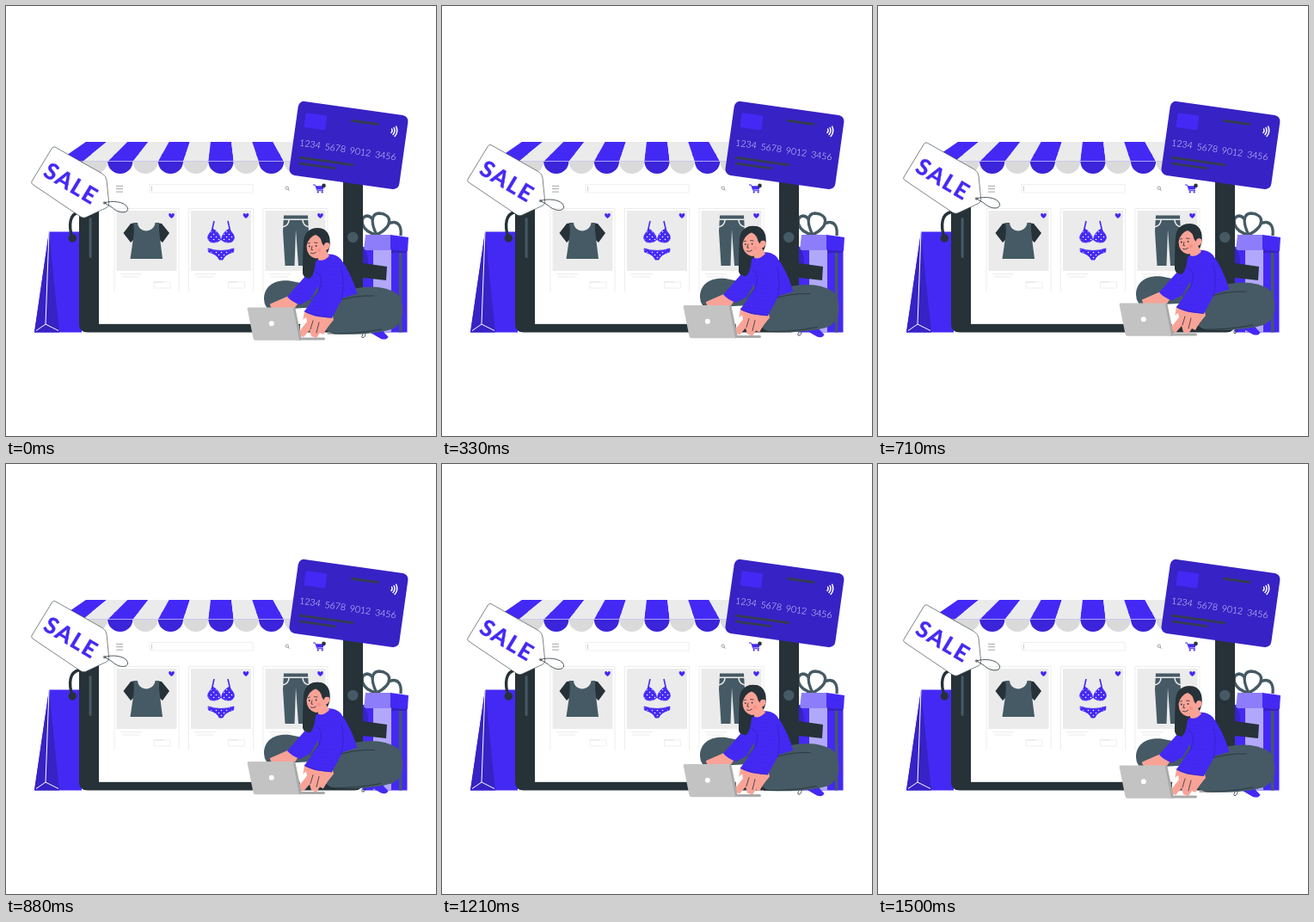
These frames come from a looping animation (500 by 500 pixels, 1540 ms). An HTML page:

```html
<!DOCTYPE html>
<html lang="en">
<head>
<meta charset="utf-8">
<title>Online shop</title>
<style>
html, body { margin: 0; width: 100%; height: 100%; overflow: hidden; background: #fff; }
svg { display: block; width: 100vw; height: 100vh; }
.blue { fill: #4429f5; }
.deep { fill: #3722c5; }
.ink { fill: #263238; }
.slate { fill: #455a64; }
.skin { fill: #f9a397; }
.line { fill: none; stroke: #263238; stroke-width: .8; stroke-linecap: round; stroke-linejoin: round; }
.fold { fill: none; stroke: #3722c5; stroke-width: .9; }
.pale { fill: none; stroke: #ececec; stroke-width: .8; }
</style>
</head>
<body>
<svg viewBox="0 0 500 500">
  <defs>
    <path id="heart" class="blue" d="M0 3.2C-5 -.4 -3.3 -3 -1.7 -2.9Q-.4 -2.8 0 -1.4Q.4 -2.8 1.7 -2.9C3.3 -3 5 -.4 0 3.2Z"/>
    <pattern id="dots" width="6" height="6" patternUnits="userSpaceOnUse">
      <rect width="6" height="6" class="blue"/>
      <circle cx="1.5" cy="1.5" r=".8" fill="#fff"/><circle cx="4.5" cy="4.5" r=".8" fill="#fff"/>
    </pattern>
    <pattern id="knit" width="8" height="4.6" patternUnits="userSpaceOnUse" patternTransform="rotate(4)">
      <rect width="8" height="4.6" class="blue"/><rect width="8" height=".5" class="deep" opacity=".4"/>
    </pattern>
  </defs>

  <!-- gift -->
  <g fill="#fff" stroke="#455a64" stroke-width="3.3" stroke-linejoin="round">
    <path d="M431 266C446 246 461 247 459 267" fill="none"/>
    <path d="M431 266C412 262 410 245 420 244C428 245 431 256 431 266Z"/>
    <path d="M431 266C422 248 427 241 434 241C449 242 451 256 431 266Z"/>
  </g>
  <rect x="415" y="280" width="51.5" height="99.5" class="blue"/>
  <rect x="427" y="283" width="21" height="96.5" fill="#b2a8fb"/>
  <rect x="457" y="283" width="3.4" height="96.5" class="slate"/>
  <path d="M418 266H448V284H416Z" fill="#8e7dfa"/>
  <path d="M447 266L468 269L467 285L447 283Z" class="blue"/>
  <path d="M448 283.500L466 285V287H448Z" class="deep"/>
  <path d="M414 281Q421 283 421 300H414Z" class="deep"/>
  <path d="M415 299L443 303L442 319L415 316Z" class="ink"/>

  <!-- bag -->
  <path d="M50 262.500H88V379.500H33Z" class="blue"/>
  <path d="M50 262.500L62 379.500H33Z" class="deep"/>
  <path d="M50 262.500L46 370M35 377.500L46 370L61 377.500" fill="none" stroke="#fff" stroke-width="1"/>

  <!-- tablet -->
  <path d="M95 172H405Q415 172 415 182V369.500Q415 379.500 405 379.500H95Q85 379.500 85 369.500V182Q85 172 95 172Z" class="ink"/>
  <rect x="108" y="174" width="284" height="195.800" fill="#fff"/>
  <rect x="96.600" y="246" width="3" height="47" rx="1.500" class="slate"/>
  <circle cx="403.300" cy="269" r="6.200" class="slate"/>

  <!-- bag handle -->
  <circle cx="77.300" cy="270" r="4.700" class="ink"/>
  <path d="M77 270C72.500 254 74 242 85 239.500" fill="none" stroke="#263238" stroke-width="3.400"/>

  <!-- shop page -->
  <path d="M128 209.300H136M128 212.700H136M128 216.100H136" stroke="#a6a6a6" stroke-width="1"/>
  <rect x="167" y="207.500" width="120" height="9.500" class="pale"/>
  <path d="M169.500 209.500V215.500" stroke="#aaa" stroke-width=".6"/>
  <circle cx="326.800" cy="211.600" r="1.700" fill="none" stroke="#777" stroke-width=".7"/>
  <path d="M328 213L329.400 214.600" stroke="#777" stroke-width=".8"/>
  <path d="M357 208H359.500L362 214.700H369" fill="none" stroke="#4429f5" stroke-width="1"/>
  <path d="M360 209.200H370L368.600 213.500H361.500Z" class="blue"/>
  <circle cx="362.700" cy="216.400" r="1.100" class="blue"/><circle cx="367.700" cy="216.400" r="1.100" class="blue"/>
  <circle cx="369.500" cy="208.900" r="2.300" class="ink"/>
  <g id="cards"></g>

  <!-- T-shirt -->
  <path d="M152 252L145 253L136.500 264L145 275L151 269ZM174 252L181 253L190 264L182 275L175 269Z" class="ink"/>
  <path d="M148 252H153C154 264.500 172 264.500 173.500 252H178Q177.500 260 179 270L182 294H144.500L148 270Q149.500 260 148 252Z" class="slate"/>

  <!-- swimwear -->
  <g fill="url(#dots)" stroke="#4429f5" stroke-width=".9">
    <path d="M240.500 259Q249 264 249.500 272Q245 276 238 274.500Q233 271 235.500 266Z"/>
    <path d="M259.500 259Q251 264 250.500 272Q255 276 262 274.500Q267 271 264.500 266Z"/>
    <path d="M235 282Q250 287 265 282L264.500 286Q254 289 252 295H248Q246 289 235.500 286Z"/>
    <path d="M242 250L239.500 261M258 250L260.500 261" stroke-width="1.600"/>
  </g>

  <!-- trousers -->
  <path d="M323 243.500H351L352 262L350 302H340L337 260L335.500 302H324.500L322 262Z" class="slate"/>
  <path d="M322 248.300H352M329 249Q328.500 256 321 257M345 249Q345.500 256 353 257" fill="none" stroke="#ebebeb" stroke-width="1.600"/>

  <g id="awning"></g>

  <!-- bank card -->
  <g transform="translate(398.5 161.9) rotate(8)">
    <rect x="-64.500" y="-43.400" width="129" height="86.800" rx="7" class="deep"/>
    <rect x="-54.500" y="-30.500" width="25" height="17" rx="2" class="blue"/>
    <path d="M-1 -28.800H31M-55 22H8.500M-54 28.800H-11" stroke="#343d50" stroke-width="2.800"/>
    <g id="digits" fill="#e6e2ff" font-family="Lato, sans-serif" font-weight="300" font-size="10.600"></g>
    <path d="M47 -25.700Q48.500 -23.500 47 -21.300M49.300 -27.500Q51.900 -23.500 49.300 -19.500M51.600 -29.300Q55.300 -23.500 51.600 -17.700"
      fill="none" stroke="#fff" stroke-width="1.500" stroke-linecap="round"/>
  </g>

  <!-- shopper -->
  <g id="woman">
    <path d="M425 373Q436 372 440 380L444.500 384.500Q443 389 436 387L424 380Z" class="blue"/>
    <path d="M417 378Q411 387 416 385.500Q419 383 418 377" class="line"/>
    <path d="M372 340L408 328Q437 323 454 334Q462 341 461.500 356Q461 370 448 376Q425 383 382 381.500Q358 376 372 340Z" class="slate"/>
    <path d="M300 341C300 325 313 318 330 319.500L372 328L366 350L330 352L312 357Q300 352 300 341Z" class="slate"/>
    <path d="M380 345Q402 336 428 337M374 381Q405 382 436 376" class="line"/>

    <path d="M360 258.500Q374 257 376.500 271Q378 282 372 290L361 298Q358 318 352 317Q344 316 345 307L346 274Q347 260 360 258.500Z" class="ink"/>
    <path d="M331 336L307 346.500Q307 350 311 353L336 351L340 345Z" class="skin"/>
    <path d="M365 290Q381 286 389 294Q401 310 408.500 334.500L387 341Q374 345 364 339L361 301Z" fill="url(#knit)"/>
    <path d="M365 292Q356 301 349 313L327 338Q332 344 342 347.500L354 341L371 312Q376 294 365 292Z" fill="url(#knit)"/>
    <path d="M347 354Q346 366 340 382L346 385L353 377L355 384L361 386L365 380L369 382Q373 374 381 365L379 356Z" class="skin"/>
    <path d="M371 310Q366 330 357 341L347 355Q356 362 379 362.500L393 337Q396 312 382 305Z" fill="url(#knit)"/>
    <path d="M390 306Q394 324 390 342M360 309Q371 313 364 331L354 343M347 355Q360 361 379 362.500" class="fold"/>
    <path d="M349 362Q340 367 342 377L350 367Z" fill="#fff"/>
    <path d="M354 376L357 366M361 380L364 368" class="line" stroke-width=".6"/>

    <path d="M363 289L371 282Q374 288 376 290.500Q369 298 363 295Z" class="skin"/>
    <path d="M349.500 270Q357 261 366 266L370 276Q376 273 376.500 278Q376 284 370.500 284Q368 293.500 360 293.500Q350 291 349.500 280Z" class="skin"/>
    <path d="M347 278Q346 262 358 258.500Q372 256.500 375.500 268L376 276Q371 273 369.500 279L367.500 276Q366 268 360 266Q353 268 349.500 278Z" class="ink"/>
    <path d="M349.500 276Q348 287 353 292L360 295Q359 313 353 317Q344 316 345 306L346 274Z" class="ink"/>
    <circle cx="352.800" cy="279.500" r=".9" class="ink"/><circle cx="360.600" cy="279" r=".9" class="ink"/>
    <path d="M351 276.300L353.500 275.500M358.500 275.100L362 275.500M355.900 279.500L354.900 283.500L356.700 283.700M354.500 287.500Q357.500 289 360.500 286.500" class="line"/>
    <circle cx="364" cy="284" r="2.200" fill="#f4857c" opacity=".55"/>

    <path d="M339 385.500H370Q372 387 370 388.500H337Z" fill="#a9a9a9"/>
    <path d="M282 350.500L334 350.500Q336 350.500 336.500 352.500L343.500 386Q344 388.700 341 388.700H290Q288 388.700 287.500 386.500L280.700 352.500Q280.300 350.500 282 350.500Z" fill="#c3c3c3"/>
    <path d="M334 350.500Q336 350.500 336.500 352.500L343.500 386Q344 388.700 341 388.700L334 352Z" fill="#a9a9a9"/>
    <circle cx="308.800" cy="369.200" r="3" fill="#fff"/>
  </g>

  <!-- price tag -->
  <g id="tag">
    <path d="M57.500 164.300L112.500 195.300Q116.500 198 117 202.500L119.700 229.500Q120 233 117 234.500L93 245.700Q90 247 87 245.300L31 207.500Q29 206 30 204L53.500 165.300Q55 163 57.500 164.300Z" fill="#fff" stroke="#263238" stroke-width=".6"/>
    <circle cx="114.500" cy="229" r="1.300" fill="#fff" stroke="#263238" stroke-width=".6"/>
    <path d="M114.500 229C122 226 139 227 141.500 235C143 241.500 131 242 123 234L114.500 229" class="line" stroke-width="1"/>
    <text transform="translate(75.2 205.8) rotate(31)" x="1" y="9.400" text-anchor="middle" class="blue" stroke="#4429f5" stroke-width=".5"
      font-family="Lato, sans-serif" font-weight="700" font-size="26" letter-spacing="2">SALE</text>
  </g>
</svg>
<script>
const $ = id => document.getElementById(id);

function shopCard(x) {
  return `<path d="M${x} 332V235.500H${x + 75}V332" fill="none" stroke="#ebebeb" stroke-width=".9"/>
    <rect x="${x + 2.5}" y="238" width="70" height="70" fill="#ebebeb"/>
    <use href="#heart" x="${x + 66.5}" y="243.800"/>
    <path d="M${x + 7} 311.800H${x + 32}M${x + 9} 315H${x + 29}" stroke="#e4e4e4" stroke-width=".8"/>
    <rect x="${x + 46}" y="321" width="19" height="7" class="pale"/>
    <path d="M${x + 46} 321H${x + 57}" stroke="#dcdcdc" stroke-width=".8"/>`;
}
$('cards').innerHTML = [126, 212.5, 299].map(shopCard).join('');

// Stripes narrow towards the top; each ends in a half-round scallop.
const step = 29.3, topX = x => 250 + (x - 250) * .825;
let stripes = '';
for (let i = -6; i <= 6; i++) {
  const l = 250 + (i - .5) * step, r = l + step, even = i % 2 === 0;
  stripes += `<path d="M${topX(l)} 158H${topX(r)}L${r} 181H${l}Z" fill="${even ? '#4429f5' : '#ebebeb'}"/>
    <path d="M${l} 180.500H${r}A${step / 2} 14.600 0 0 1 ${l} 180.500Z" fill="${even ? '#3b24da' : '#dadada'}"/>`;
}
$('awning').innerHTML = stripes + '<path d="M60 180.500H440" stroke="#c9c3f2" stroke-width=".8"/>';

$('digits').innerHTML = ['1234', '5678', '9012', '3456']
  .map((s, i) => `<text x="${-57 + i * 29.6}" y="${8.5 + i * .4}">${s}</text>`).join('');

const loop = 1540, rise = 5;
function draw(now) {
  const y = -rise * (1 - Math.cos((now + 50) / loop * 2 * Math.PI)) / 2;
  for (const id of ['woman', 'tag']) $(id).setAttribute('transform', `translate(0 ${y.toFixed(3)})`);
}
const start = performance.now();
function tick() {
  draw((performance.now() - start) % loop);
  requestAnimationFrame(tick);
}
tick();
</script>
</body>
</html>
```
